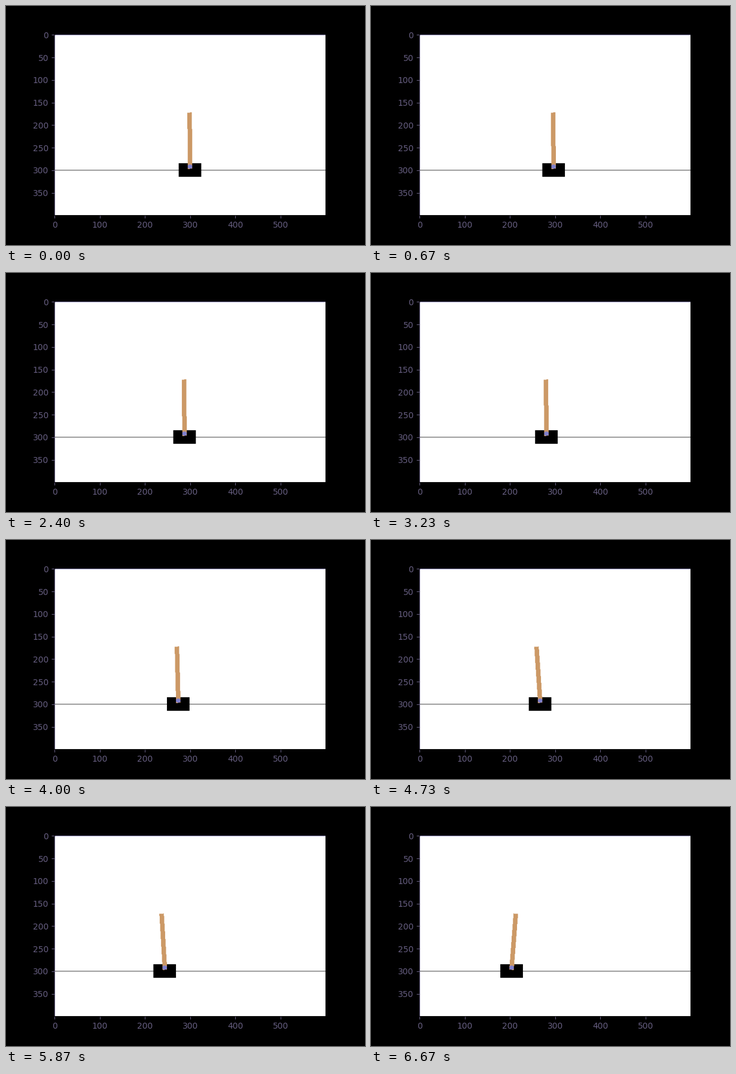
Animation of 600 by 400 pixels, one loop 6710 ms. Source, as a matplotlib script:

```python
import numpy as np
import matplotlib.pyplot as plt
from matplotlib.animation import FuncAnimation
from matplotlib.patches import Rectangle

W, H = 600, 400
LOOP, TICK = 6710, 22          # ms
STEP = 33.4                    # ms per simulation step
TRACK_Y, AXLE_Y = 300, 292.5
POLE_TOP, POLE_END, POLE_R = 120, -5, 5
TAN, VIOLET = (204, 153, 102), (128, 128, 204)
DIM, PALE = (.40, .37, .50), (.64, .62, .80)

# time in ms, cart centre in px, pole lean in radians (right is positive)
POSES = np.array([
    (0, 300, -.006), (2400, 287.8, -.007), (4000, 273.8, -.025),
    (4730, 266.8, -.067), (4930, 256.3, -.01), (5630, 250.5, -.05),
    (5870, 243.3, -.059), (6670, 203, .08),
])


def glide(t, ts, vs):
    """Monotone cubic curve through the points (ts, vs)."""
    dt = np.diff(ts)
    d = np.diff(vs) / dt
    a, b = d[:-1], d[1:]
    same = a * b > 0
    inner = np.where(same, 2 * a * b / np.where(same, a + b, 1), 0)
    m = np.concatenate([d[:1], inner, d[-1:]])
    t = np.clip(t, ts[0], ts[-1])
    i = min(np.searchsorted(ts, t, side="right") - 1, len(dt) - 1)
    u, h = (t - ts[i]) / dt[i], dt[i]
    return ((1 + 2 * u) * (1 - u) ** 2 * vs[i] + u * (1 - u) ** 2 * h * m[i]
            + u * u * (3 - 2 * u) * vs[i + 1] + u * u * (u - 1) * h * m[i + 1])


Y, X = np.mgrid[0:H, 0:W] + 0.5


def render(cx, lean):
    img = np.full((H, W, 3), 255, np.uint8)
    img[TRACK_Y] = 0
    img[(abs(X - cx) < 25) & (abs(Y - TRACK_Y) < 15)] = 0
    dx, up = X - cx, AXLE_Y - Y
    along = dx * np.sin(lean) + up * np.cos(lean)
    across = dx * np.cos(lean) - up * np.sin(lean)
    pole = (abs(across) < POLE_R) & (along > POLE_END) & (along < POLE_TOP)
    img[pole] = TAN
    img[dx ** 2 + up ** 2 < POLE_R ** 2] = VIOLET
    return img


def pose(t):
    ts, xs, leans = POSES.T
    return glide(t, ts, xs), glide(t, ts, leans)


plt.rcParams["font.family"] = "DejaVu Sans"
fig, ax = plt.subplots(figsize=(W / 100, H / 100), dpi=100, facecolor="black")
fig.subplots_adjust(left=.125, right=.9, bottom=.125, top=.88)
view = ax.imshow(render(*pose(0)), interpolation="antialiased")
ax.set_xticks(range(0, W, 100))
ax.set_yticks(range(0, H, 50))
ax.tick_params(color=DIM, labelcolor=DIM)
ax.spines["left"].set_color(DIM)

# pale line under the top border, in figure pixels
fig.add_artist(Rectangle((82, H - 49), 452, 1, color=PALE, lw=0,
                         transform=None, zorder=5))


def update(i):
    t = (i + .5) * TICK // STEP * STEP
    view.set_data(render(*pose(t)))
    return view,


anim = FuncAnimation(fig, update, frames=LOOP // TICK, interval=TICK,
                     repeat=True, repeat_delay=0)
plt.show()
```
